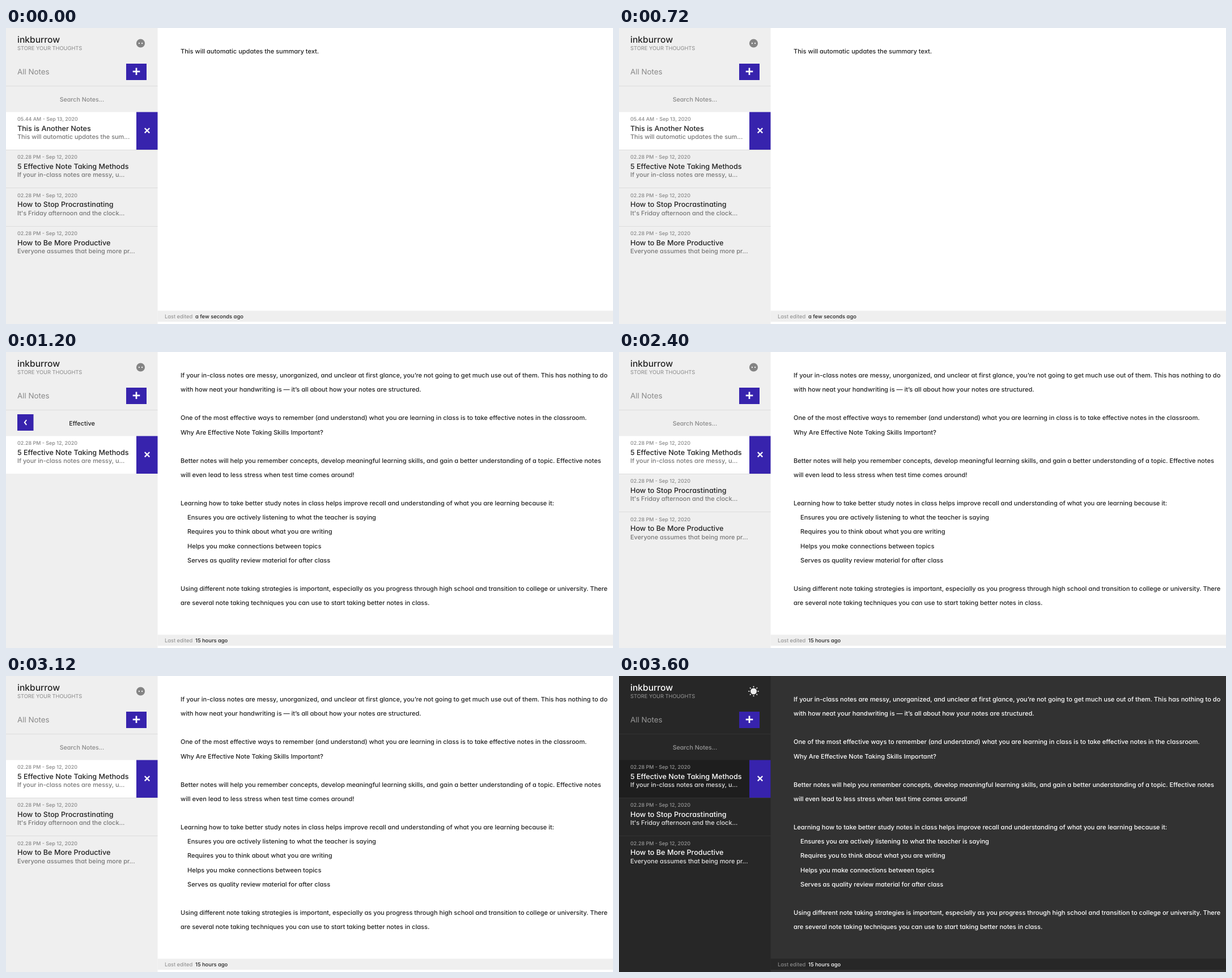
These frames come from a looping animation (1071x523 px, 4800 ms). An HTML page:

```html
<!DOCTYPE html>
<html lang="en">
<head>
<meta charset="utf-8">
<title>Notes app</title>
<style>
  html, body { margin: 0; width: 100%; height: 100%; overflow: hidden; }
  svg {
    display: block; width: 1071px; height: 523px;
    font-family: Inter, "Open Sans", sans-serif;
    font-weight: 500;
    font-feature-settings: "cv11";
    text-rendering: geometricPrecision;
    animation: theme 4.8s step-end infinite;
  }
  @keyframes theme {
    0% {
      --side: #efefef; --page: #fff; --active: #fff; --line: #dcdcdc;
      --ink: #222; --soft: #777; --mute: #888; --moon: 1; --sun: 0;
    }
    75%, 100% {
      --side: #272727; --page: #323232; --active: #1e1e1e; --line: #333;
      --ink: #fff; --soft: #e2e2e2; --mute: #999; --moon: 0; --sun: 1;
    }
  }

  .home, .search, .picked, .essay, .idle { animation: 4.8s step-end infinite; }
  .home   { animation-name: home; }
  .search { animation-name: search; }
  .picked { animation-name: picked; }
  .essay  { animation-name: essay; }
  .idle   { animation-name: idle; }
  @keyframes home   { 0% { opacity: 1 } 25%, 100% { opacity: 0 } }
  @keyframes search { 0% { opacity: 0 } 25% { opacity: 1 } 50%, 100% { opacity: 0 } }
  @keyframes picked { 0% { opacity: 0 } 50%, 100% { opacity: 1 } }
  @keyframes essay  { 0% { opacity: 0 } 25%, 100% { opacity: 1 } }
  @keyframes idle   { 0% { opacity: 1 } 25% { opacity: 0 } 50%, 100% { opacity: 1 } }

  .side { fill: var(--side); }
  .page { fill: var(--page); }
  .active { fill: var(--active); }
  .line { fill: var(--line); }
  .button { fill: #3723ad; }
  .glyph { fill: none; stroke: #fff; }
  .moon { opacity: var(--moon); }
  .sun { opacity: var(--sun); fill: #eee; stroke: #eee; }

  text { fill: var(--ink); }
  .brand { font-size: 15.6px; }
  .tag { font-size: 9.3px; font-weight: 400; fill: var(--mute); }
  .all { font-size: 13.35px; font-weight: 400; fill: var(--mute); }
  .hint { font-size: 10.65px; fill: var(--mute); text-anchor: middle; }
  .query { font-size: 10.9px; text-anchor: middle; }
  .date { font-size: 8.95px; fill: var(--mute); }
  .name { font-size: 12.63px; }
  .brief { font-size: 10.92px; fill: var(--soft); }
  .body { font-size: 11.04px; }
  .foot { font-size: 9.35px; }
  .label { font-weight: 400; fill: var(--mute); }
</style>
</head>
<body>
<svg viewBox="0 0 1071 523">
  <rect class="page" width="1071" height="523"/>
  <rect class="side" width="267.5" height="523"/>
  <rect class="side" x="267.5" y="499.5" width="803.5" height="19.5"/>

  <text class="brand" x="20" y="26">inkburrow</text>
  <text class="tag" x="20" y="39">STORE YOUR THOUGHTS</text>
  <text class="all" x="20" y="82">All Notes</text>

  <g class="moon">
    <circle cx="237.5" cy="27" r="7.6" fill="#848484"/>
    <circle class="side" cx="234.9" cy="27" r="1.2"/>
    <circle class="side" cx="240.1" cy="27" r="1.2"/>
  </g>
  <g class="sun" id="sun" transform="translate(237.5 27)">
    <circle r="5.5" stroke="none"/>
  </g>

  <rect class="button" x="212" y="63" width="36" height="29"/>
  <path class="glyph" d="M223.7 76.8h12.6M230 70.5v12.6" stroke-width="2.7"/>
  <rect class="line" y="102" width="267.5" height="1"/>

  <text class="hint idle" x="134" y="130">Search Notes...</text>
  <g class="search">
    <rect class="button" x="20" y="110" width="28.5" height="29"/>
    <path class="glyph" d="M36.2 120L32.8 124.4L36.2 128.8" stroke-width="2"/>
    <text class="query" x="134" y="130">Effective</text>
  </g>

  <rect class="active" y="148.5" width="230" height="66.5"/>
  <g id="lists"></g>
  <rect class="button" x="230" y="148.5" width="37.5" height="66.5"/>
  <path class="glyph" d="M244.8 177l8.4 8.4M253.2 177l-8.4 8.4" stroke-width="2.3"/>

  <text class="body home" x="308" y="45">This will automatic updates the summary text.</text>
  <g class="essay" id="essay"></g>

  <text class="foot label" x="280" y="513">Last edited</text>
  <text class="foot home" x="334" y="513">a few seconds ago</text>
  <text class="foot essay" x="334" y="513">15 hours ago</text>
</svg>

<script>
  const byId = id => document.getElementById(id);
  const text = (kind, x, y, s) =>
    `<text class="${kind}" x="${x}" y="${Math.round(y)}">${s}</text>`;

  const day = '02.28 PM - Sep 12, 2020';
  const notes = [
    ['05.44 AM - Sep 13, 2020', 'This is Another Notes', 'This will automatic updates the sum...'],
    [day, '5 Effective Note Taking Methods', 'If your in-class notes are messy, u...'],
    [day, 'How to Stop Procrastinating', "It's Friday afternoon and the clock..."],
    [day, 'How to Be More Productive', 'Everyone assumes that being more pr...']
  ];

  function row([date, name, brief], i, all) {
    const y = 67.25 * i;
    const rule = i < all.length - 1
      ? `<rect class="line" y="${Math.round(215 + y)}" width="267.5" height="1"/>` : '';
    return text('date', 20, 164.2 + y, date) + text('name', 20, 181.8 + y, name) +
      text('brief', 20, 196.1 + y, brief) + rule;
  }
  const list = (kind, items) => `<g class="${kind}">${items.map(row).join('')}</g>`;

  byId('lists').innerHTML =
    list('home', notes) + list('search', [notes[1]]) + list('picked', notes.slice(1));

  // A leading tab marks an indented line.
  const essay = [
    'If your in-class notes are messy, unorganized, and unclear at first glance, you’re not going to get much use out of them. This has nothing to do',
    'with how neat your handwriting is — it’s all about how your notes are structured.',
    '',
    'One of the most effective ways to remember (and understand) what you are learning in class is to take effective notes in the classroom.',
    'Why Are Effective Note Taking Skills Important?',
    '',
    'Better notes will help you remember concepts, develop meaningful learning skills, and gain a better understanding of a topic. Effective notes',
    'will even lead to less stress when test time comes around!',
    '',
    'Learning how to take better study notes in class helps improve recall and understanding of what you are learning because it:',
    '\tEnsures you are actively listening to what the teacher is saying',
    '\tRequires you to think about what you are writing',
    '\tHelps you make connections between topics',
    '\tServes as quality review material for after class',
    '',
    'Using different note taking strategies is important, especially as you progress through high school and transition to college or university. There',
    'are several note taking techniques you can use to start taking better notes in class.'
  ];
  byId('essay').innerHTML = essay.map((s, i) =>
    s && text('body', s[0] === '\t' ? 320 : 308, 45 + 25.13 * i, s.trim())).join('');

  for (let a = 0; a < 360; a += 45)
    byId('sun').innerHTML += `<path d="M0 -7V-9.2" stroke-width="1.7" transform="rotate(${a})"/>`;
</script>
</body>
</html>
```
